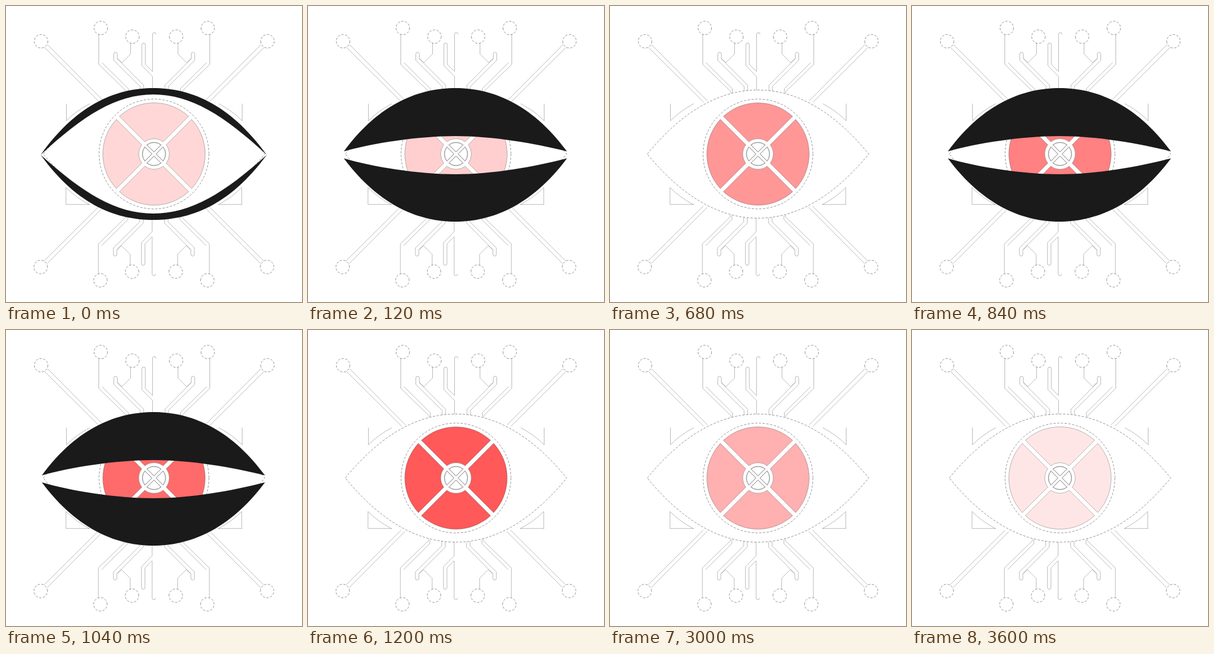
Recreate the animation shown at these times as an HTML page. Size 512 by 512 pixels, loop 3720 ms.

```html
<!DOCTYPE html>
<html lang="en">
<head>
<meta charset="utf-8">
<title>Circuit eye</title>
<style>
  html, body { margin: 0; width: 100%; height: 100%; overflow: hidden; background: #fff; }
  svg { display: block; width: 100vw; height: 100vh; }
  .line { fill: none; stroke: #111; stroke-width: .3; }
  circle, .curve { stroke-width: .45; stroke-dasharray: 4 2.5; }
</style>
</head>
<body>
<svg viewBox="0 0 512 512">
  <defs>
    <g id="corner">
      <circle cx="60.7" cy="61" r="11.7"/>
      <circle cx="164" cy="38" r="11.7"/>
      <circle cx="218.7" cy="53" r="11.7"/>
      <path d="M72 67L168.5 164M66.5 71.5L162 166.5"/>
      <path d="M160.5 49.5V101L209 148V151M166 98L211.5 143V150"/>
      <path d="M232 147V139L186.5 94V83a3 3 0 0 1 6 0V91L238 137V146"/>
      <path d="M215.5 64.5V83L200.5 98L193 91"/>
      <path d="M104.5 169V198.5Q122 181 145 169"/>
    </g>
    <g id="stems">
      <path d="M253.5 146V122L235 103V67a3 3 0 0 1 6 0V101L253.5 113.5"/>
      <path d="M253.5 113V49a3 3 0 0 1 6 0"/>
    </g>
    <g id="half">
      <use href="#corner"/>
      <use href="#corner" transform="matrix(-1 0 0 1 513 0)"/>
      <use href="#stems"/>
    </g>
  </defs>
  <g class="line">
    <use href="#half"/>
    <use href="#half" transform="matrix(1 0 0 -1 -.7 512.5)"/>
    <path d="M104 343.3H145M367 343.3H408.3"/>
    <path class="curve" d="M64.5 256C130 176 195 145.3 256 145.3S382 176 447.5 256C382 336 317 367 256 367S130 336 64.5 256Z"/>
    <circle cx="256" cy="256" r="95"/>
    <path id="pupil"/>
    <path id="iris"/>
  </g>
  <path id="lids" fill="#1a1a1a"/>
</svg>
<script>
const LOOP = 3720, BLINK = 720, OPEN_AT = 480, BLINKS_END = 1200;
// Half height of the gap between the lids, per 40 ms of a blink
const GAPS = [103, 80, 58, 33, 0, 0, 0, 0, 33, 58, 80, 103];
// Iris strength: time, opacity
const FADE = [[0, .155], [360, .258], [680, .406], [840, .495], [1200, .652], [1440, .715],
  [1680, .74], [1860, .74], [2100, .70], [2400, .605], [3000, .31], [3360, .155], [3600, .1], [3720, .1]];

const [iris, pupil, lids] = ['iris', 'pupil', 'lids'].map(id => document.getElementById(id));

function polar(r, angle) {
  return `${256 + r * Math.cos(angle)} ${256 + r * Math.sin(angle)}`;
}

// Four sectors separated by diagonal spokes of the given width
function sectors(inner, outer, spoke) {
  const q = Math.PI / 4;
  const half = r => q - Math.asin(spoke / 2 / r);
  const a = half(inner), b = half(outer);
  return [0, 1, 2, 3].map(i => {
    const mid = i * 2 * q;
    return `M${polar(inner, mid - a)}L${polar(outer, mid - b)}` +
      `A${outer} ${outer} 0 0 1 ${polar(outer, mid + b)}L${polar(inner, mid + a)}` +
      `A${inner} ${inner} 0 0 0 ${polar(inner, mid - a)}Z`;
  }).join('');
}

function strength(t) {
  const i = FADE.findIndex(([time]) => time > t);
  const [t0, v0] = FADE[i - 1], [t1, v1] = FADE[i];
  return v0 + (v1 - v0) * (t - t0) / (t1 - t0);
}

function lidPath(gap) {
  if (!gap) {
    return 'M58 257C125 166 195 142 255 142S385 166 454 256C385 349 315 373.5 255 373.5S125 349 58 257Z';
  }
  const wide = gap > 100;
  const tip = wide ? 0 : 6, middle = wide ? 256 : 258;
  const left = wide ? 60 : 62, right = wide ? 451 : 448;
  const lid = (side, outer) => {
    const end = 257.5 + side * tip, inner = middle + side * gap;
    const bend = end + (inner - end) * (wide ? .65 : .54);
    const bow = 257 + side * 91;
    return `M${left} ${end}C125 ${bow} 195 ${outer} 255 ${outer}S385 ${bow} ${right} ${end}` +
      `C${wide ? 378 : 390} ${bend} 320 ${inner} 255 ${inner}S${wide ? 133 : 112} ${bend} ${left} ${end}Z`;
  };
  return lid(-1, 142) + lid(1, wide ? 370 : 373);
}

function draw(t) {
  const phase = t % BLINK;
  const open = t >= BLINKS_END || phase >= OPEN_AT;
  const step = t < BLINKS_END && (!open || t >= 680) ? 40 : 120;
  const shade = Math.round(255 * (1 - strength(t - t % step)));
  iris.style.fill = `rgb(255,${shade},${shade})`;
  lids.style.display = open ? 'none' : '';
  if (!open) lids.setAttribute('d', lidPath(GAPS[Math.floor(phase / 40)]));
}

iris.setAttribute('d', sectors(26.5, 88.5, 7.4));
pupil.setAttribute('d', sectors(3.6, 20, 5));
pupil.style.strokeWidth = .6;

const start = performance.now();
function tick() {
  draw((performance.now() - start) % LOOP);
  requestAnimationFrame(tick);
}
tick();
</script>
</body>
</html>
```
